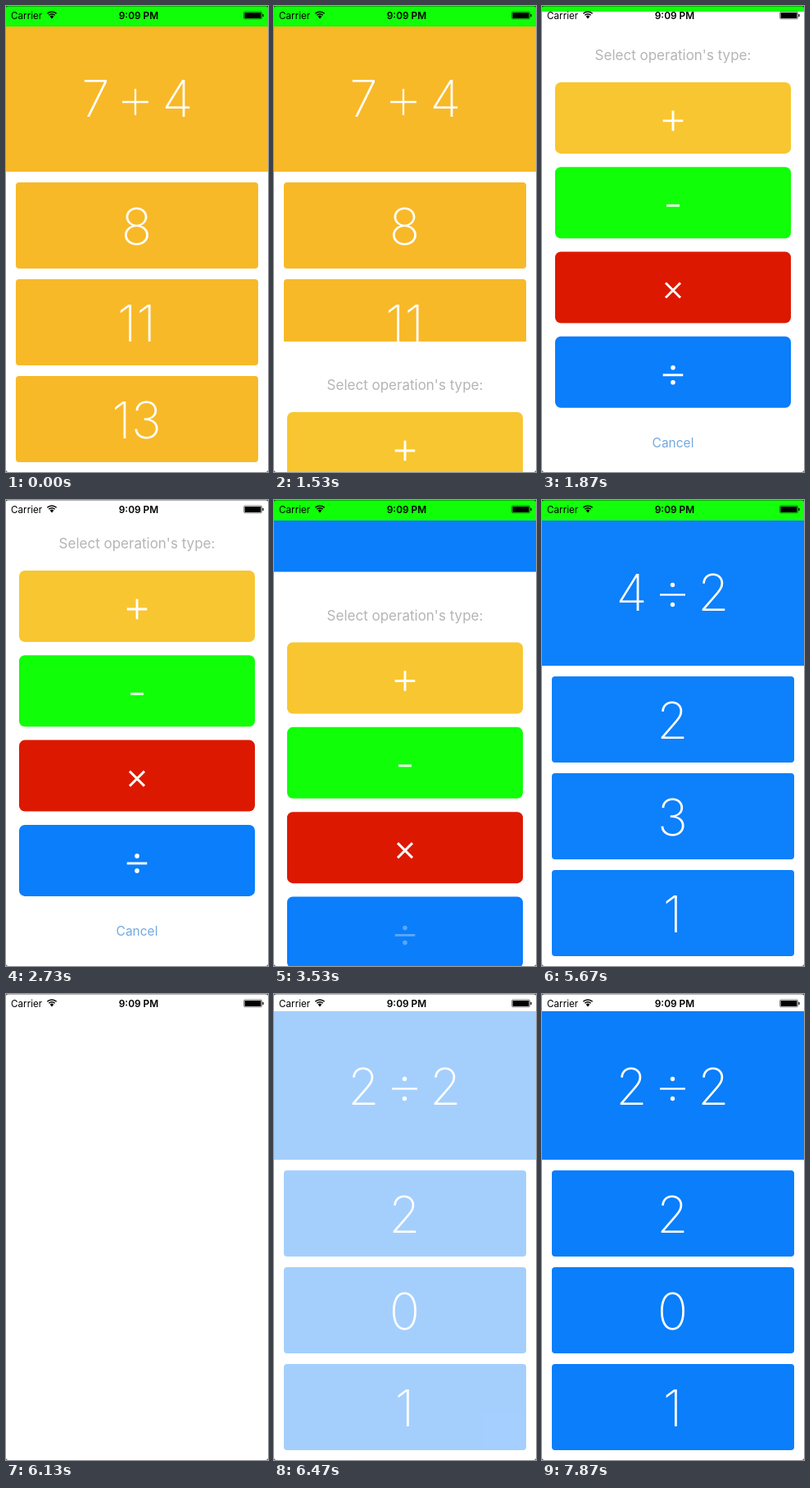
An HTML page for the animation above (7.94 s loop, 320 px wide and 568 px high).

```html
<!DOCTYPE html>
<html lang="en">
<head>
<meta charset="utf-8">
<title>Math quiz</title>
<style>
  html, body { margin: 0; width: 100%; height: 100%; overflow: hidden; background: #fff; }
  svg { display: block; width: 320px; height: 568px; font-family: Inter, Roboto, sans-serif; }
  .num { font-size: 62px; font-weight: 200; fill: #fff; text-anchor: middle; }
  .mid { text-anchor: middle; }
</style>
</head>
<body>
<svg id="stage" viewBox="0 0 320 568"></svg>
<script>
const LOOP = 7940;
const YELLOW = '#f8b928', GREEN = '#10ff08', RED = '#dd1800', BLUE = '#0a7efb';
const OPEN_AT = 1465, CLOSE_AT = 3487, STIFF = 15.8;

const clamp = v => Math.max(0, Math.min(1, v));
const ramp = (t, a, b) => clamp((t - a) / (b - a));
const ease = p => p * p * (3 - 2 * p);
// critically damped spring from 0 to 1
const spring = ms => {
  const x = Math.max(0, ms) / 1000 * STIFF;
  return 1 - (1 + x) * Math.exp(-x);
};

const rect = (x, y, w, h, fill, r = 0) =>
  `<rect x="${x}" y="${y}" width="${w}" height="${h}" rx="${r}" fill="${fill}"/>`;
const num = (x, y, s) => `<text class="num" x="${x}" y="${y}">${s}</text>`;

// operator sign: half length a, stroke w, dot radius r, dot distance d
function sign(op, x, y, a, w, r, d) {
  const dot = dy => `<circle cx="${x}" cy="${y + dy}" r="${r}" fill="#fff"/>`;
  const path = {
    '+': `M${x - a} ${y}h${2 * a}M${x} ${y - a}v${2 * a}`,
    '-': `M${x - a} ${y}h${2 * a}`,
    'x': `M${x - a} ${y - a}l${2 * a} ${2 * a}M${x + a} ${y - a}l${-2 * a} ${2 * a}`,
    '/': `M${x - a} ${y}h${2 * a}`
  }[op];
  return `<path d="${path}" stroke="#fff" stroke-width="${w}" fill="none"/>` +
    (op === '/' ? dot(-d) + dot(d) : '');
}

function quiz(id, color, top, [left, op, right], answers) {
  const head = op === '+' ? sign(op, 158, 117, 16, 2.3) : sign(op, 159.5, 115.5, 15.5, 2.3, 2.7, 12);
  const rows = answers.map((s, i) =>
    rect(12, 215 + 118 * i, 296, 105, color, 4) + num(159.5, 290.5 + 118 * i, s)).join('');
  const bar = top > 21 ? rect(0, 0, 320, top, GREEN) : '';
  return `<g id="${id}">${bar}${rect(0, top, 320, 202 - top, color)}` +
    num(109.5, 134.5, left) + head + num(209.5, 134.5, right) + rows + '</g>';
}

function sheet() {
  const items = [
    ['#f8c630', '+', 12.3], [GREEN, '-', 8], [RED, 'x', 9], [BLUE, '/', 12.3]
  ];
  const rows = items.map(([color, op, a], i) => {
    const y = 86 + 103.3 * i;
    return rect(16, y, 288, 87, color, 7) +
      `<g id="op${i}">${sign(op, 160, y + 47, a, 2.9, 2.8, 9)}</g>`;
  }).join('');
  return `<g id="sheet">${rect(0, 0, 320, 568, '#fff')}` +
    '<text class="mid" x="160" y="59" font-size="17" fill="#b5b5b5">Select operation\'s type:</text>' + rows +
    '<text class="mid" x="160" y="531" font-size="15.5" fill="#72a9e0">Cancel</text></g>';
}

function statusBar() {
  const arc = r => {
    const k = r * Math.SQRT1_2;
    return `M${56 - k} ${15 - k}A${r} ${r} 0 0 1 ${56 + k} ${15 - k}`;
  };
  return '<text x="6" y="15.7" font-size="11.7">Carrier</text>' +
    `<path d="${arc(8)}${arc(5.2)}" fill="none" stroke="#000" stroke-width="1.5"/>` +
    '<path d="M56 15.4l-2.3-2.6a3.2 3.2 0 0 1 4.6 0z"/>' +
    '<text class="mid" x="162" y="15.7" font-size="11.9" font-weight="600">9:09 PM</text>' +
    '<rect x="290.5" y="6.9" width="22" height="9" rx="1.6" fill="none" stroke="#000" stroke-opacity=".6" stroke-width=".8"/>' +
    rect(291.5, 7.9, 20, 7, '#000', .6) + rect(313.3, 9.8, 1.3, 3.4, '#000', .6);
}

const corners = '<path d="M0 0h320v.7H0z" opacity=".4"/>' +
  '<path d="M0 0h3Q0 0 0 3zM320 0v3Q320 0 317 0zM0 568v-3Q0 568 3 568zM320 568h-3Q320 568 320 565z" opacity=".7"/>';

const stage = document.getElementById('stage');
stage.innerHTML = rect(0, 0, 320, 568, '#fff') +
  quiz('sum', YELLOW, 25, ['7', '+', '4'], ['8', '11', '13']) +
  quiz('div', BLUE, 25, ['4', '/', '2'], ['2', '3', '1']) +
  quiz('next', BLUE, 21, ['2', '/', '2'], ['2', '0', '1']) +
  sheet() + statusBar() + corners;

const [sum, div, next, panel, tapped] =
  ['sum', 'div', 'next', 'sheet', 'op3'].map(id => document.getElementById(id));

const fade = (el, a) => {
  el.setAttribute('opacity', a.toFixed(3));
  el.setAttribute('visibility', a > 0 ? 'visible' : 'hidden');
};

function draw(t) {
  fade(sum, t < 3300 ? 1 : 0);
  fade(div, t < 3300 ? 0 : 1 - ease(ramp(t, 5640, 6070)));
  fade(next, ease(ramp(t, 6170, 6900)));

  const y = 568 * (t < CLOSE_AT ? 1 - spring(t - OPEN_AT) : spring(t - CLOSE_AT));
  panel.setAttribute('transform', `translate(0 ${(y < .4 ? 0 : y).toFixed(2)})`);
  panel.setAttribute('visibility', y < 567.6 ? 'visible' : 'hidden');

  const dim = t < 3390 ? 1 : .25 + .75 * ramp(t, CLOSE_AT, CLOSE_AT + 470);
  tapped.setAttribute('opacity', dim.toFixed(3));
}

const start = performance.now();
function tick() {
  draw((performance.now() - start) % LOOP);
  requestAnimationFrame(tick);
}
tick();
</script>
</body>
</html>
```
